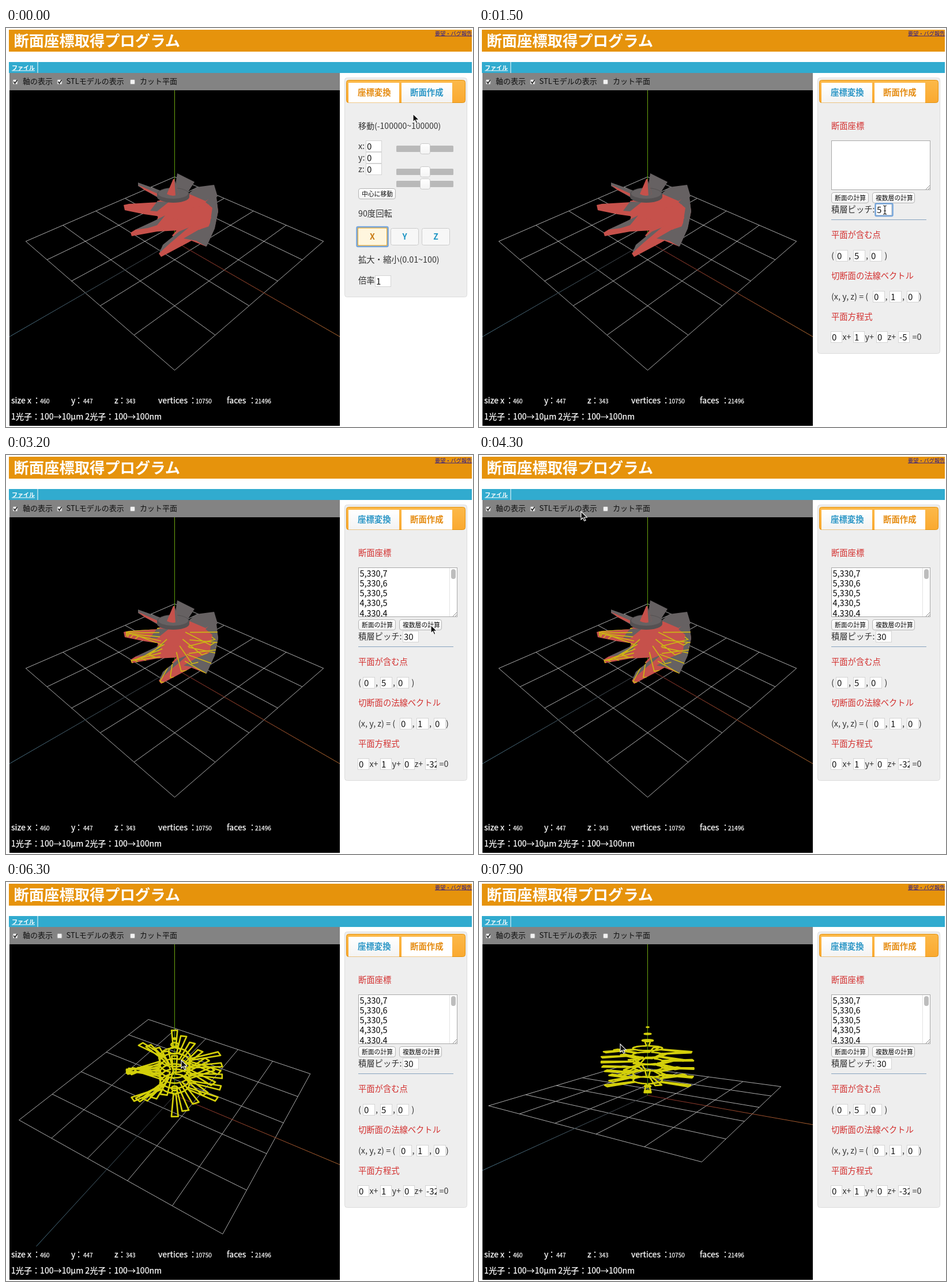
Recreate the animation shown at these times as an HTML page with a canvas. Size 810x692 px, loop 8000 ms.

```html
<!DOCTYPE html>
<html lang="ja">
<head>
<meta charset="utf-8">
<style>
html, body { margin: 0; width: 100%; height: 100%; overflow: hidden; background: #fff; }
canvas { position: absolute; left: 6px; top: 108px; }
svg { position: absolute; left: 0; top: 0; }
text { font: 14.3px "Noto Sans CJK JP", "Noto Sans CJK", sans-serif; fill: #333; white-space: pre; }
.h1 { font-size: 26.3px; font-weight: bold; fill: #fff; }
.link { font-size: 9.2px; fill: #2b1a8c; text-decoration: underline; }
.menu { font-size: 10px; font-weight: bold; fill: #fff; text-decoration: underline; }
.bar { font-size: 13px; fill: #111; }
.tab { font-size: 14.4px; font-weight: bold; }
.red { fill: #d3302f; }
.in { font-size: 15px; fill: #111; }
.list { font-size: 14.4px; fill: #000; }
.btn { font-size: 10.8px; fill: #111; }
.axis { font-size: 14px; font-weight: bold; text-anchor: middle; }
.info { font-size: 14.1px; }
.val { font-size: 10px; }
.info, .val { fill: #fff; stroke: #fff; stroke-width: .25; }
.status { font-size: 10px; fill: #222; }
</style>
</head>
<body>
<canvas id="view" width="573" height="582"></canvas>
<svg id="ui" width="810" height="692" viewBox="0 0 810 692"></svg>
<script>
const LOOP = 8000, STEP = 100, RAD = Math.PI / 180;
const $ = id => document.getElementById(id);

// ---- interface ----
const rect = (x, y, w, h, fill, more = '') =>
  `<rect x="${x}" y="${y}" width="${w}" height="${h}" fill="${fill}" ${more}/>`;
const txt = (x, y, s, cls = '', more = '') => `<text x="${x}" y="${y}" class="${cls}" ${more}>${s}</text>`;
const field = (x, y, w, s, id = '') =>
  rect(x + .5, y + .5, w - 1, 19, '#fff', 'stroke="#d4d4d4"') + txt(x + 2, y + 15.5, s, 'in', id && `id="${id}"`);
const button = (x, y, w, s) =>
  rect(x + .5, y + .5, w - 1, 18, 'url(#soft)', 'rx="3.5" stroke="#b5b5b5"') + txt(x + 6, y + 13.5, s, 'btn');
const ring = (x, y, w, h, id = '') =>
  rect(x, y, w, h, 'none', `id="${id}" rx="2" stroke="#76a5da" stroke-width="2.5"`);
const group = (id, s) => `<g id="${id}">${s}</g>`;
const check = (x, id) => rect(x + .5, 89.5, 8, 8, '#f2f2f2', 'rx="1.5" stroke="#a0a0a0"') +
  (id ? `<path id="${id}" d="M${x + 2} 93l2 3 4-6" fill="none" stroke="#222" stroke-width="1.6"/>` : '');
const slider = y => rect(677, y - 5.5, 99, 11, '#b9b9b9', 'rx="1.5"') +
  rect(718.5, y - 9, 17, 18, 'url(#soft)', 'rx="3" stroke="#c9c9c9"');
const axisButton = (x, s) => rect(x + .5, 347.5, 48, 29, '#f7f7f7', 'rx="3" stroke="#ccc"') +
  txt(x + 24.5, 367, s, 'axis', 'style="fill:#1c94c4"');
const info = (x, label, colon, vx, v) =>
  txt(x, 651, label, 'info') + txt(colon, 651, '：', 'info') + txt(vx, 651, v, 'val');

const header = rect(5, 3, 803, 38, '#e6930c') + txt(13.5, 31.5, '断面座標取得プログラム', 'h1') +
  txt(744, 12.5, '要望・バグ報告', 'link') +
  rect(5, 59, 803, 19, '#31abcf') + txt(10, 72.5, 'ファイル', 'menu') + rect(54.5, 59, 1, 19, '#fff') +
  rect(6, 78, 573, 30, '#838383') +
  check(11.5, 'c1') + txt(29, 97, '軸の表示', 'bar') +
  check(88.5, 'stl') + txt(104.5, 97, 'STLモデルの表示', 'bar') +
  check(215) + txt(232, 97, 'カット平面', 'bar');

const footer = info(9, 'size x', 46, 59, '460') + info(113, 'y', 119, 134, '447') +
  info(188, 'z', 194, 208, '343') + info(264, 'vertices', 317, 329, '10750') +
  info(383, 'faces', 420, 432, '21496') +
  txt(9, 679, '1光子：100→10μm 2光子：100→100nm', 'info');

const tabs = rect(587.5, 86.5, 212, 380, '#eee', 'id="panel" rx="4" stroke="#dcdcdc"') +
  rect(590.5, 90.5, 206, 39, 'url(#gold)', 'rx="4" stroke="#e3920f"') +
  rect(594, 95, 88, 34.5, 'url(#soft)', 'id="tab1"') + rect(686, 95, 88, 34.5, 'url(#soft)', 'id="tab2"') +
  txt(610, 117, '座標変換', 'tab', 'id="name1"') + txt(701, 117, '断面作成', 'tab', 'id="name2"') +
  ring(685.5, 94.5, 90, 35.5, 'tabRing');

const move = txt(611, 175, '移動(-100000~100000)', '', 'style="font-size:14px"') +
  ['x:', 'y:', 'z:'].map((s, i) => txt(611, 210 + i * 20, s) + field(624, 195 + i * 20, 28, '0')).join('') +
  [209.5, 249.5, 270.5].map(slider).join('') +
  button(611, 278, 65, '中心に移動') + txt(611, 327, '90度回転') +
  rect(610, 346.5, 51, 31, '#fff6de', 'rx="2" stroke="#f3b23c" stroke-width="2"') +
  ring(608.5, 345, 54, 34) + txt(635.5, 367, 'X', 'axis', 'style="fill:#c97a12"') +
  axisButton(667, 'Y') + axisButton(721, 'Z') +
  txt(611, 407, '拡大・縮小(0.01~100)') + txt(611, 443, '倍率') + field(640, 429, 28, '1');

const rows = ['5,330,7', '5,330,6', '5,330,5', '4,330,5', '4,330,4'];
const cut = txt(611, 175, '断面座標', 'red') +
  rect(611.5, 195.5, 171, 85, '#fff', 'stroke="#a9a9a9"') +
  group('result', `<g clip-path="url(#area)">${rows.map((s, i) => txt(613.5, 210.5 + i * 17.3, s, 'list')).join('')}</g>` +
    rect(769, 196, 1, 84, '#e2e2e2') + rect(772, 198, 8, 17, '#bdbdbd', 'rx="4"')) +
  '<path d="M775 280l7-7M779 280l3-3" stroke="#888"/>' +
  button(611, 285, 65, '断面の計算') + button(682, 285, 74, '複数層の計算') +
  txt(611, 319.5, '積層ピッチ:') + field(688, 305, 28, '5', 'pitch') + ring(687.5, 304.5, 30, 21.5, 'pitchRing') +
  rect(611, 332, 165, 1, '#87a3bf') +
  txt(611, 364, '平面が含む点', 'red') + txt(611, 400, '(') +
  field(619, 385, 21, '0') + txt(641, 400, ',') + field(649, 385, 21, '5') + txt(671, 400, ',') +
  field(678, 385, 21, '0') + txt(703.5, 400, ')') +
  txt(611, 435, '切断面の法線ベクトル', 'red') + txt(611, 471, '(x, y, z) = (') +
  field(683, 456, 21, '0') + txt(704.5, 471, ',') + field(712, 456, 21, '1') + txt(734, 471, ',') +
  field(742, 456, 21, '0') + txt(763, 471, ')') +
  txt(611, 506, '平面方程式', 'red') +
  field(610, 526, 20, '0') + txt(630.5, 541, 'x+') + field(649, 526, 20, '1') + txt(669.5, 541, 'y+') +
  field(689, 526, 20, '0') + txt(708.5, 541, 'z+') +
  `<g clip-path="url(#plane)">${field(727, 526, 20, '-5', 'offset')}</g>` + txt(751.5, 541, '=0');

$('ui').innerHTML = `<defs>
  <linearGradient id="soft" x2="0" y2="1"><stop stop-color="#fff"/><stop offset="1" stop-color="#f3f3f3"/></linearGradient>
  <linearGradient id="gold" x2="0" y2="1"><stop stop-color="#fcb949"/><stop offset="1" stop-color="#faa930"/></linearGradient>
  <clipPath id="area"><rect x="612" y="196" width="157" height="84"/></clipPath>
  <clipPath id="plane"><rect x="727" y="526" width="20" height="20"/></clipPath></defs>` +
  header + footer + tabs + group('move', move) + group('cut', cut) +
  group('status', '<path d="M0 682h184q4 0 4 4v6H0z" fill="#eee" stroke="#bbb"/>' + txt(0, 691.5, 'html#createIS', 'status')) +
  '<path id="arrow" d="M0 0v14l3.2-3 2.4 5.4 2.4-1-2.4-5.2h4.6z" fill="#111" stroke="#fff" stroke-width="1.1"/>' +
  '<path id="beam" d="M-3-7q3 0 3 2q0-2 3-2M0-5V6M-3 8q3 0 3-2q0 2 3 2M-2 2h4" fill="none" stroke="#222" stroke-width="1.2"/>';

// ---- timeline ----
const pointer = [[0, 706, 149], [300, 712, 141], [600, 719, 120], [900, 719, 120], [1300, 704, 315],
  [1900, 704, 315], [2300, 755, 287], [2500, 737, 295], [3200, 737, 295], [4300, 177, 98], [4500, 96, 94],
  [4600, 96, 94], [4900, 280, 300], [5300, 310, 408], [5500, 310, 408], [6300, 304, 309], [6800, 303, 258],
  [7100, 303, 258], [7600, 245, 281]];
// time, azimuth, elevation
const orbit = [[4900, 45, 35.26], [5200, 32.3, 90], [5500, 32.3, 90], [6300, 31.8, 42.6], [6800, 32, 16.5]];

function at(keys, t) {
  if (t <= keys[0][0]) return keys[0].slice(1);
  for (let i = 1; i < keys.length; i++) {
    const a = keys[i - 1], b = keys[i];
    if (t < b[0]) return a.slice(1).map((v, j) => v + (b[j + 1] - v) * (t - a[0]) / (b[0] - a[0]));
  }
  return keys[keys.length - 1].slice(1);
}

// ---- 3D view ----
const g = $('view').getContext('2d');
const DIST = 1732, FOCAL = 632.5;
let cam;

function project(x, y, z) {
  const { sa, ca, se, ce } = cam, fwd = -(x * sa + z * ca);
  const k = FOCAL / (DIST + fwd * ce - y * se);
  return [286.5 + k * (x * ca - z * sa), 262 - k * (fwd * se + y * ce)];
}
function trace(points, close) {
  points.forEach((p, i) => g[i ? 'lineTo' : 'moveTo'](...project(...p)));
  if (close) g.closePath();
}
function drawGrid() {
  g.strokeStyle = '#adadad';
  g.lineWidth = 1;
  g.beginPath();
  for (let v = -500; v <= 500; v += 200) {
    trace([[v, 0, -500], [v, 0, 500]]);
    trace([[-500, 0, v], [500, 0, v]]);
  }
  g.stroke();
}
function drawAxis(end, from, to) {
  const a = project(0, 0, 0), b = project(...end);
  const fade = g.createLinearGradient(...a, ...b);
  fade.addColorStop(0, from);
  fade.addColorStop(1, to);
  g.strokeStyle = fade;
  g.beginPath();
  trace([[0, 0, 0], end]);
  g.stroke();
}

// six twisted blades; every second one ends a layer lower
const BLADES = 6, LAYERS = 6, TWIST = 12, HUB = 68, TIP = 213;
const polar = (r, deg, y) => [r * Math.cos(deg * RAD), y, -r * Math.sin(deg * RAD)];
const angle = (layer, blade) => 212 + blade * 360 / BLADES + (layer - (LAYERS - 1) / 2) * TWIST;
const height = layer => 75 + layer * 30;
const hasBlade = (layer, blade) => layer < LAYERS - 1 || blade % 2 === 0;

function bladeOutline(layer, blade) {
  const a = angle(layer, blade), y = height(layer);
  return [polar(HUB, a - 4.5, y), polar(TIP, a - 3.8, y), polar(TIP, a + 3.8, y), polar(HUB, a + 4.5, y)];
}
function drawSlices() {
  g.strokeStyle = '#d3cf0a';
  g.lineWidth = 2.7;
  g.lineJoin = 'round';
  g.beginPath();
  for (let k = 0; k < LAYERS; k++) {
    const path = [];
    for (let b = 0; b < BLADES; b++) {
      if (hasBlade(k, b)) path.push(...bladeOutline(k, b));
      for (let d = 14; d < 50; d += 8) path.push(polar(HUB, angle(k, b) + d, height(k)));
    }
    trace(path, true);
  }
  // shaft below and nose above the blades
  for (const [y, r] of [[20, 13], [45, 15], [260, 25], [290, 15], [320, 5]]) {
    const path = [];
    for (let d = 0; d < 360; d += 20) path.push(polar(r, d, y));
    trace(path, true);
  }
  g.stroke();
}

// solid shown only from the first viewpoint; page coordinates
const RED = '#c6514b', GREY = '#666162', DARK = '#555152';
const solid = [
  [GREY, 'M297 252L327 267L316 284L292 284Z'],
  [GREY, 'M318 286L330 276L361 272L367 292L346 308L320 303Z'],
  [RED, 'M262 300L318 288L346 300L364 290L368 318L362 346L347 379L322 369L304 374L288 360L300 346L262 333L266 318Z'],
  [GREY, 'M346 302L364 284L368 318L362 348L348 379L340 372L354 338L358 312Z'],
  [GREY, 'M229 268L268 282L272 292L263 294L229 274Z'],
  [RED, 'M229 272L262 287L266 294L240 281Z'],
  [RED, 'M204 307L213 305L264 302L286 316L268 327L240 323L206 316Z'],
  [GREY, 'M262 301L282 302L262 318L250 317Z'],
  [RED, 'M216 355L224 350L262 333L274 326L312 336L300 351L262 353L218 361Z'],
  [GREY, 'M224 350L256 335L276 325L262 342L246 347Z'],
  [GREY, 'M266 390L272 376L300 353L322 344L306 362L284 376Z'],
  [RED, 'M265 391L286 372L318 345L338 338L350 350L318 371L269 397Z'],
  [GREY, 'M308 365L334 350L352 344L354 358L347 379L330 369Z'],
  [RED, 'M322 312L352 306L356 330L336 350L318 340Z'],
  [DARK, 'M262 288A28 11 0 0 1 318 288V293A28 10 0 0 1 262 293Z'],
  [GREY, 'M264 287A26 9 0 0 1 316 287A26 9 0 0 1 264 287Z'],
  [RED, 'M290 262H292L300 288Q290 294 279 288Z'],
  [GREY, 'M292 262L300 288L294 291Z']
].map(([fill, d]) => ({ fill, path: new Path2D(d) }));
const silhouette = new Path2D();
solid.forEach(s => silhouette.addPath(s.path));

function drawSolid(sliced) {
  g.save();
  g.translate(-6, -108);
  for (const { fill, path } of solid) {
    g.fillStyle = fill;
    g.fill(path);
  }
  if (sliced) {
    g.clip(silhouette);
    g.translate(6, 108);
    g.strokeStyle = '#cdb514';
    g.lineWidth = 1.7;
    g.beginPath();
    for (let k = 0; k < LAYERS; k++) for (let b = 0; b < BLADES; b++) {
      if (!hasBlade(k, b) || Math.sin((angle(k, b) - 45) * RAD) > .6) continue;
      trace(bladeOutline(k, b).slice(0, 3));
    }
    g.stroke();
  }
  g.restore();
}

function drawView(t, solidOn, sliced) {
  const [az, el] = at(orbit, t).map(v => v * RAD);
  cam = { sa: Math.sin(az), ca: Math.cos(az), se: Math.sin(el), ce: Math.cos(el) };
  g.fillStyle = '#000';
  g.fillRect(0, 0, 573, 582);
  g.save();
  g.beginPath();
  g.rect(0, 0, 573, 524);
  g.clip();
  drawGrid();
  drawAxis([1000, 0, 0], '#8a2f2c', '#b87a30');
  drawAxis([0, 1000, 0], '#4a9400', '#8fb820');
  drawAxis([0, 0, 1000], '#404044', '#4a7f98');
  if (solidOn) drawSolid(sliced);
  else drawSlices();
  g.restore();
}

// ---- playback ----
const show = (id, on) => $(id).setAttribute('display', on ? 'inline' : 'none');
const within = (t, a, b) => t >= a && t < b;
let last = -1;

function render(t) {
  const cutTab = t >= 500, done = t >= 3000, solidOn = t < 4600;
  drawView(t, solidOn, done);
  show('move', !cutTab);
  show('cut', cutTab);
  show('result', done);
  show('stl', solidOn);
  show('tabRing', within(t, 500, 1400));
  show('pitchRing', within(t, 1400, 2600));
  show('status', within(t, 400, 1100));
  $('panel').setAttribute('height', cutTab ? 478 : 380);
  $('name1').style.fill = cutTab ? '#2b96c6' : '#e58b10';
  $('name2').style.fill = cutTab ? '#e58b10' : '#2b96c6';
  $('tab1').setAttribute('fill', cutTab ? 'url(#soft)' : '#fff');
  $('tab2').setAttribute('fill', cutTab ? '#fff' : 'url(#soft)');
  $('pitch').textContent = t < 1700 ? '5' : t < 1900 ? '3' : '30';
  $('offset').textContent = done ? '-325' : '-5';
  const beam = within(t, 600, 1000) || within(t, 1300, 2000);
  const [x, y] = at(pointer, t);
  show('beam', beam);
  show('arrow', !beam);
  $(beam ? 'beam' : 'arrow').setAttribute('transform', `translate(${x} ${y})`);
}
function tick() {
  const t = Math.floor(performance.now() % LOOP / STEP) * STEP;
  if (t !== last) render(last = t);
  requestAnimationFrame(tick);
}
tick();
</script>
</body>
</html>
```
